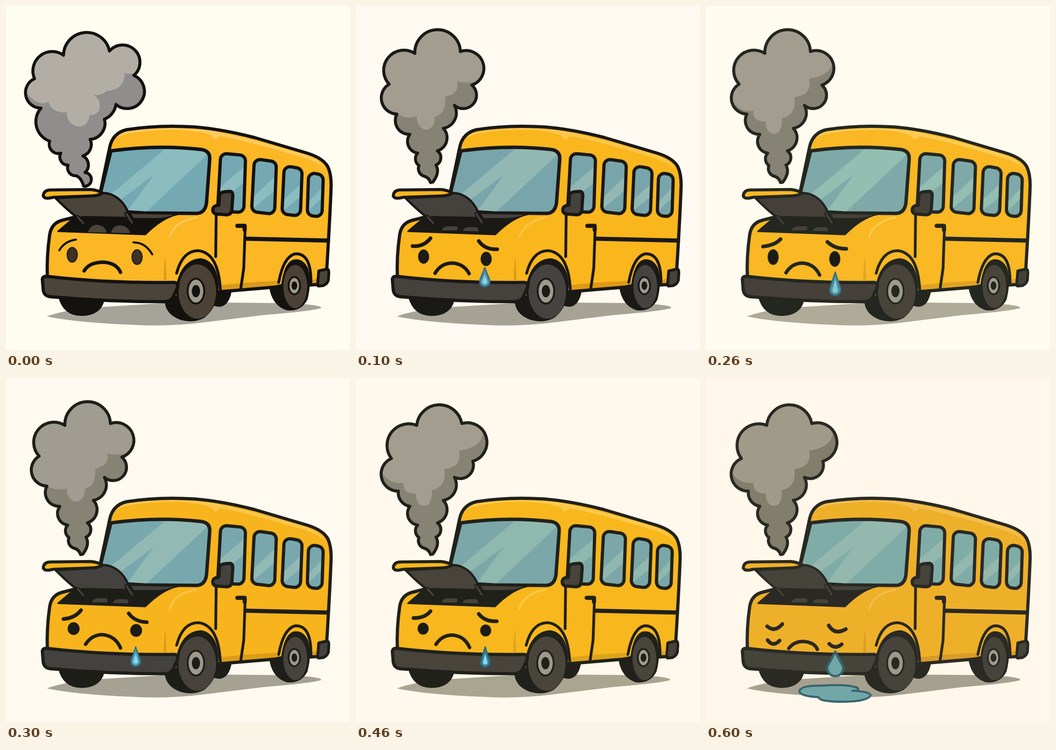
Animation, 748 px wide and 748 px high, one loop 0.7 s. Source, as an HTML page with a canvas:

```html
<!DOCTYPE html>
<html lang="en">
<head>
<meta charset="utf-8">
<title>Sad bus</title>
<style>
html, body { margin: 0; width: 100%; height: 100%; overflow: hidden; background: #fefaef; }
canvas { display: block; width: 748px; height: 748px; }
</style>
</head>
<body>
<canvas id="stage" width="748" height="748"></canvas>
<script>
const ctx = document.getElementById('stage').getContext('2d');
const STEP = 100;

// One entry per pose: colours, horizontal squeeze and the parts that differ
const base = {
  squeeze: 1, sag: 0, browWidth: 8, eye: '#1d1b17', rim: '#9d998d',
  light: '#a29d8f', shade: '#878374'
};
const poses = [
  { bg: '#fffcf0', ink: '#14120f', yellow: '#fbb724', low: '#d99a1b', shine: '#fdca5c',
    glass: '#74a8b3', glare: '#8bbcc0', dark: '#4a443b', tyre: '#4b4135', ground: '#a6a39b',
    big: true, light: '#b3aea5', shade: '#8f8e8c', browWidth: 4.5, eye: '#3e3224',
    brows: 'M116 531Q128 511 152 508M277 514Q303 514 318 540',
    eyes: [144, 541, 285, 546, 11, 16], mouth: 'M170 576Q180 558 210 557Q240 558 249 579' },
  { bg: '#fef9f1', ink: '#1b1916', yellow: '#fab61d', low: '#dd9a14', shine: '#fbc549',
    glass: '#78a5ab', glare: '#93b8b4', dark: '#45423e', tyre: '#45433f', ground: '#a6a294',
    open: true, soft: true,
    brows: 'M123 522Q147 524 162 505M267 511Q280 530 307 529',
    eyes: [147, 545, 283, 550, 11, 14.5], mouth: 'M172 581Q185 559 210 559Q235 561 246 582',
    tear: [280, 569, 610, 11], wet: ['#4f95b2', '#2f6d88', '#8fd0e0'] },
  { bg: '#fffbee', ink: '#232720', yellow: '#f9b824', low: '#dfa324', shine: '#fccb52',
    glass: '#7fa9a9', glare: '#93beb2', dark: '#46403a', tyre: '#49443a', ground: '#b0aa99',
    squeeze: .9965,
    brows: 'M124 523Q150 520 162 507M264 513Q280 528 305 528',
    eyes: [146, 546, 280, 550, 11, 16], mouth: 'M174 580Q187 559 210 559Q236 561 247 585',
    tear: [281, 579, 629, 12], wet: ['#4d93a5', '#33707f', '#86c6d2'] },
  { bg: '#fefaef', ink: '#1e1e19', yellow: '#f8b41c', low: '#dc9c18', shine: '#fbc54b',
    glass: '#78a8ae', glare: '#93b9b4', dark: '#44423e', tyre: '#47433c', ground: '#a5a293',
    soft: true, light: '#a09c92',
    brows: 'M125 524Q150 522 163 505M267 512Q280 530 306 531',
    eyes: [147, 545, 283, 549, 12, 13], mouth: 'M173 579Q187 558 210 558Q238 561 249 587',
    tear: [282, 585, 626, 10], wet: ['#4fa2bd', '#32728a', '#92d4e4'] },
  { bg: '#fef9ec', ink: '#20211a', yellow: '#f8b71c', low: '#dda31d', shine: '#fcca4a',
    glass: '#7ca7a8', glare: '#8fb8ae', dark: '#48433b', tyre: '#49453a', ground: '#aaa591',
    squeeze: .9965, open: true, sag: 1,
    brows: 'M125 522Q150 522 162 507M267 513Q280 530 306 529',
    eyes: [146, 545, 282, 549, 11, 12], mouth: 'M174 579Q187 559 210 559Q236 561 247 586',
    tear: [281, 585, 628, 10], wet: ['#38859b', '#27697e', '#8fd6ea'] },
  { bg: '#fef8ec', ink: '#262722', yellow: '#eeb01f', low: '#d69a1c', shine: '#f4c04a',
    glass: '#83a6a4', glare: '#98b7ad', dark: '#45453e', tyre: '#45443c', ground: '#a8a190',
    squeeze: .9965, sag: 1, light: '#9f9b89', shade: '#837f6e',
    brows: 'M127 523Q152 524 161 510M268 517Q280 531 304 531',
    eyes: [148, 551, 280, 558, 10.5, 13], mouth: 'M174 583Q187 560 210 560Q236 561 247 587',
    tear: [280, 588, 632, 13], wet: ['#82c0ca', '#3c7a8a'],
    puddle: 'M222 685Q226 674 265 675Q290 671 304 677Q298 682 315 682Q340 683 339 692Q334 702 295 702Q262 702 263 693Q222 694 222 685Z' },
  { bg: '#fff8ea', ink: '#2a2924', yellow: '#efb029', low: '#d99c29', shine: '#f3be4e',
    glass: '#80aca8', glare: '#94b8ae', dark: '#45443b', tyre: '#45433a', ground: '#a6a08f',
    squeeze: .9965, sag: 1, light: '#9f9b88', shade: '#827e6c',
    brows: 'M133 540Q150 554 166 535M267 538Q280 560 304 546M134 570Q146 586 160 571M268 578Q281 591 295 579',
    mouth: 'M180 588Q192 572 213 573Q236 575 242 590',
    tear: [281, 595, 648, 17], wet: ['#72a7a7', '#38656f'],
    puddle: 'M203 681Q206 668 250 669Q305 665 328 673Q338 681 318 680Q358 682 358 690Q352 703 300 704Q245 704 245 694Q205 692 203 681Z' }
].map(p => ({ ...base, ...p }));

const path = d => new Path2D(d);
const shapes = {
  ground: path('M89 675Q120 662 200 655L345 646L480 645L600 646Q690 649 685 657Q660 664 560 672L430 688Q350 698 270 693Q150 688 89 675Z'),
  farWheels: path('M114 630Q124 673 165 673Q205 672 213 640ZM440 622Q438 653 465 653Q485 650 490 618Z'),
  body: path('M90 592Q88 545 95 497Q99 472 122 466L150 459L205 405L226 305Q233 276 262 269Q330 258 410 263Q470 268 540 286L655 320Q690 331 700 350Q707 365 707 390Q705 450 697 580L690 605L600 610L468 621L375 636L90 600Z'),
  lowBand: path('M466 607L517 602L596 597L594 608L468 619ZM664 596L680 592L680 604L664 605Z'),
  roofShine: path('M237 288Q260 274 330 270Q410 267 445 281L455 291L466 283Q540 297 650 331Q686 343 695 357Q686 336 650 323Q540 290 440 269Q330 261 262 273Q241 277 237 288Z'),
  windscreen: path('M228 315Q330 301 425 312Q444 315 443 333L436 428Q433 450 415 451L300 450L250 447L206 404Z'),
  screenGlare: path('M352 306L425 308L437 324L300 452L262 448L322 367L245 424L225 412Z'),
  sideGlare: path('M521 347L521 381L464 426L466 394ZM588 368L588 398L533 444L533 420ZM644 384L644 412L600 447L601 424ZM690 392L690 414L655 448L656 428Z'),
  cavity: path('M113 490L146 462L275 452L374 453Q340 460 303 497Z'),
  cavityLip: path('M272 452L366 454Q350 460 330 461L278 461Z'),
  bumpEngine: path('M178 492Q184 475 199 476Q216 478 219 493ZM228 493Q234 476 249 477Q266 479 270 494Z'),
  flatEngine: path('M186 488Q191 479 199 479H219Q223 482 219 488ZM232 489Q236 481 244 481H262Q268 484 265 490Z'),
  hoodUnder: path('M108 418L192 413Q205 403 226 409Q250 417 263 443L277 471L271 474L261 461L168 459L158 461L146 453Q130 440 108 418Z'),
  hoodProp: path('M156 459L168 472M262 452L274 471'),
  hoodLip: path('M81 413Q82 400 97 400L185 399Q202 401 209 407Q200 413 186 413L102 416Q84 421 81 413Z'),
  crease: path('M347 544Q343 570 343 596L349 596Z'),
  fenderShine: path('M356 502Q366 468 414 460'),
  doorLines: path('M457 455L456 545M520 482L517 570L510 618'),
  handle: path('M503 478L519 478L519 487'),
  stripe: path('M522 506L700 510'),
  mirror: path('M464 412Q466 405 475 404L487 403Q494 404 493 415L491 444Q490 453 480 454L455 452Q448 448 450 440Q452 434 463 433Z'),
  tail: path('M680 576L698 572Q702 572 702 580L701 596Q699 604 690 608L680 609Q677 609 678 600Z'),
  arches: path('M371 581Q384 532 418 532Q462 537 466 617M593 601Q603 546 628 539Q665 536 663 606'),
  frontTyre: path('M372 605Q384 552 424 550Q459 556 461 612Q458 656 430 677Q408 689 380 681Q350 670 347 645L372 630Z'),
  rearTyre: path('M574 612Q580 650 610 660Q640 664 654 638Q664 600 655 570Q644 549 625 553Q606 560 600 606Z'),
  bumper: path('M79 594Q80 587 90 588Q220 603 364 601Q376 601 373 612L364 632Q358 643 345 643Q220 643 95 632Q83 630 81 618Z'),
  bigCloud: path('M169 392Q163 372 152 369A17 17 0 0 1 135 346A18 18 0 0 1 119 320A20 20 0 0 1 95 294A45 45 0 0 1 76 222A33.5 33.5 0 0 1 62 158A42 42 0 0 1 125 107A50.5 50.5 0 0 1 225 98A37.6 37.6 0 1 1 278 151A37.5 37.5 0 1 1 239 214A40 40 0 0 1 214 246A35 35 0 0 1 183 290A26 26 0 0 1 167 326A22 22 0 0 1 172 362A15 15 0 0 1 169 392Z'),
  bigLight: path('M30 30H330L288 142Q275 150 258 146Q258 182 219 185Q205 196 190 193Q208 205 203 225Q198 238 182 237Q178 262 158 262Q134 260 132 231Q100 234 92 208Q70 220 46 190Z'),
  softLight: path('M30 30H330L290 160Q240 170 220 164Q226 190 194 197Q196 236 172 240Q170 268 152 269Q133 266 132 240Q110 246 92 236L30 235Z'),
  hardLight: path('M30 30H310L276 108Q280 150 224 158Q232 194 192 198Q198 236 165 244Q166 277 148 278Q130 276 130 251Q102 252 103 228Q72 232 54 203Z')
};

// Side windows as corner points, clockwise
const panes = [
  [[467, 320], [521, 325], [517, 449], [460, 446]],
  [[540, 332], [588, 339], [584, 453], [534, 447]],
  [[605, 347], [644, 354], [640, 457], [600, 452]],
  [[658, 361], [690, 368], [687, 459], [655, 455]]
].map(pts => {
  const p = new Path2D(), [a, b] = pts;
  p.moveTo((a[0] + b[0]) / 2, (a[1] + b[1]) / 2);
  for (let i = 1; i <= 4; i++) p.arcTo(...pts[i % 4], ...pts[(i + 1) % 4], 13);
  p.closePath();
  return p;
});

function fill(shape, color) {
  ctx.fillStyle = color;
  ctx.fill(shape);
}

function line(shape, color, width) {
  ctx.strokeStyle = color;
  ctx.lineWidth = width;
  ctx.stroke(shape);
}

function outlined(shape, color, ink, width = 7) {
  fill(shape, color);
  line(shape, ink, width);
}

function inside(shape, paint) {
  ctx.save();
  ctx.clip(shape);
  paint();
  ctx.restore();
}

function oval(x, y, rx, ry) {
  const p = new Path2D();
  p.ellipse(x, y, rx, ry, 0, 0, Math.PI * 2);
  return p;
}

function drop(x, top, bottom, r) {
  const y = bottom - r, side = y - r * .35, mid = (top + side) / 2;
  return path(`M${x} ${top}Q${x + r * .45} ${mid} ${x + r * .93} ${side}` +
    `A${r} ${r} 0 1 1 ${x - r * .93} ${side}Q${x - r * .45} ${mid} ${x} ${top}Z`);
}

// Round puffs joined at cusps; sag lowers the side puffs
function cloud(sag, open) {
  const puffs = [
    [17, 137, 347], [18, 134, 320], [26, 117, 279], [30, 89 + 3 * sag, 235 + 11 * sag],
    [35 + 2 * sag, 72 + 5 * sag, 170 + 5 * sag], [44 + 3 * sag, 128 + 4 * sag, 103],
    [49.5, 227 + 3 * sag, 99], [38, 252 + 2 * sag, 172 + 9 * sag], [29, 214, 216],
    [34, 190, 266], [30, 177, 315], [18, 174, 346]
  ];
  const arcs = puffs.map(([r, x, y]) => `A${r} ${r} 0 0 1 ${x} ${y}`).join('');
  return path(`M162 384Q159 373 148 370${arcs}Q183 362 167 383${open ? '' : 'Z'}`);
}

function drawSmoke(p) {
  const s = shapes;
  const puff = p.big ? s.bigCloud : cloud(p.sag, p.open);
  fill(puff, p.shade);
  inside(puff, () => fill(p.big ? s.bigLight : p.soft ? s.softLight : s.hardLight, p.light));
  line(puff, p.ink, 6.5);
}

function drawWindows(p) {
  const s = shapes;
  fill(s.windscreen, p.glass);
  inside(s.windscreen, () => fill(s.screenGlare, p.glare));
  line(s.windscreen, p.ink, 7.5);
  for (const pane of panes) {
    fill(pane, p.glass);
    inside(pane, () => fill(s.sideGlare, p.glare));
    line(pane, p.ink, 7);
  }
}

function drawWheel(p, tyre, x, y, rx, ry, hubX, hubY, hub) {
  outlined(tyre, p.ink, p.ink, 3);
  fill(oval(x, y, rx, ry), p.tyre);
  outlined(oval(hubX, hubY, hub, hub * 1.5), p.rim, p.ink, 4);
  fill(oval(hubX, hubY, hub * .5, hub * .74), p.ink);
}

function drawHood(p) {
  const s = shapes;
  fill(s.cavity, p.ink);
  line(s.cavity, p.ink, 3);
  fill(s.cavityLip, p.dark);
  fill(p.big ? s.bumpEngine : s.flatEngine, p.dark);
  outlined(s.hoodUnder, p.dark, p.ink, 5);
  line(s.hoodProp, p.ink, 9);
  line(s.hoodProp, p.dark, 4);
  outlined(s.hoodLip, p.yellow, p.ink, 6.5);
}

function drawFace(p) {
  line(path(p.brows), p.ink, p.browWidth);
  line(path(p.mouth), p.ink, 7.5);
  if (p.eyes) {
    const [lx, ly, x, y, rx, ry] = p.eyes;
    outlined(oval(lx, ly, rx, ry), p.eye, p.ink, 2);
    outlined(oval(x, y, rx, ry), p.eye, p.ink, 2);
  }
}

function drawWater(p) {
  if (p.puddle) outlined(path(p.puddle), p.wet[0], p.wet[1], 4.5);
  if (!p.tear) return;
  const [x, top, bottom, r] = p.tear;
  outlined(drop(x, top, bottom, r), p.wet[0], p.wet[1], r > 12 ? 5 : 3);
  if (p.wet[2]) fill(drop(x, top + 15, bottom - 5, r * .5), p.wet[2]);
}

function drawBus(p) {
  const s = shapes;
  fill(s.ground, p.ground);
  outlined(s.farWheels, p.ink, p.ink, 2);
  fill(s.body, p.yellow);
  fill(s.roofShine, p.shine);
  fill(s.lowBand, p.low);
  fill(s.crease, p.low);
  line(s.fenderShine, p.shine, 4);
  line(s.body, p.ink, 7);
  drawWindows(p);
  line(s.doorLines, p.ink, 6);
  line(s.handle, p.ink, 9);
  line(s.stripe, p.ink, 9);
  outlined(s.mirror, p.dark, p.ink);
  outlined(s.tail, p.dark, p.ink, 6);
  line(s.arches, p.ink, 6);
  drawWheel(p, s.frontTyre, 416, 621, 41, 59, 413, 620, 18);
  drawWheel(p, s.rearTyre, 629, 610, 26, 47, 627, 608, 12.5);
  drawHood(p);
  outlined(s.bumper, p.dark, p.ink);
}

function draw(now) {
  const p = poses[Math.floor(now / STEP) % poses.length];
  ctx.fillStyle = p.bg;
  ctx.fillRect(0, 0, 748, 748);
  ctx.lineCap = ctx.lineJoin = 'round';
  ctx.save();
  ctx.translate(90 * (1 - p.squeeze), 0);
  ctx.scale(p.squeeze, 1);
  drawBus(p);
  ctx.restore();
  drawSmoke(p);
  drawFace(p);
  drawWater(p);
  requestAnimationFrame(draw);
}

draw(0);
</script>
</body>
</html>
```
